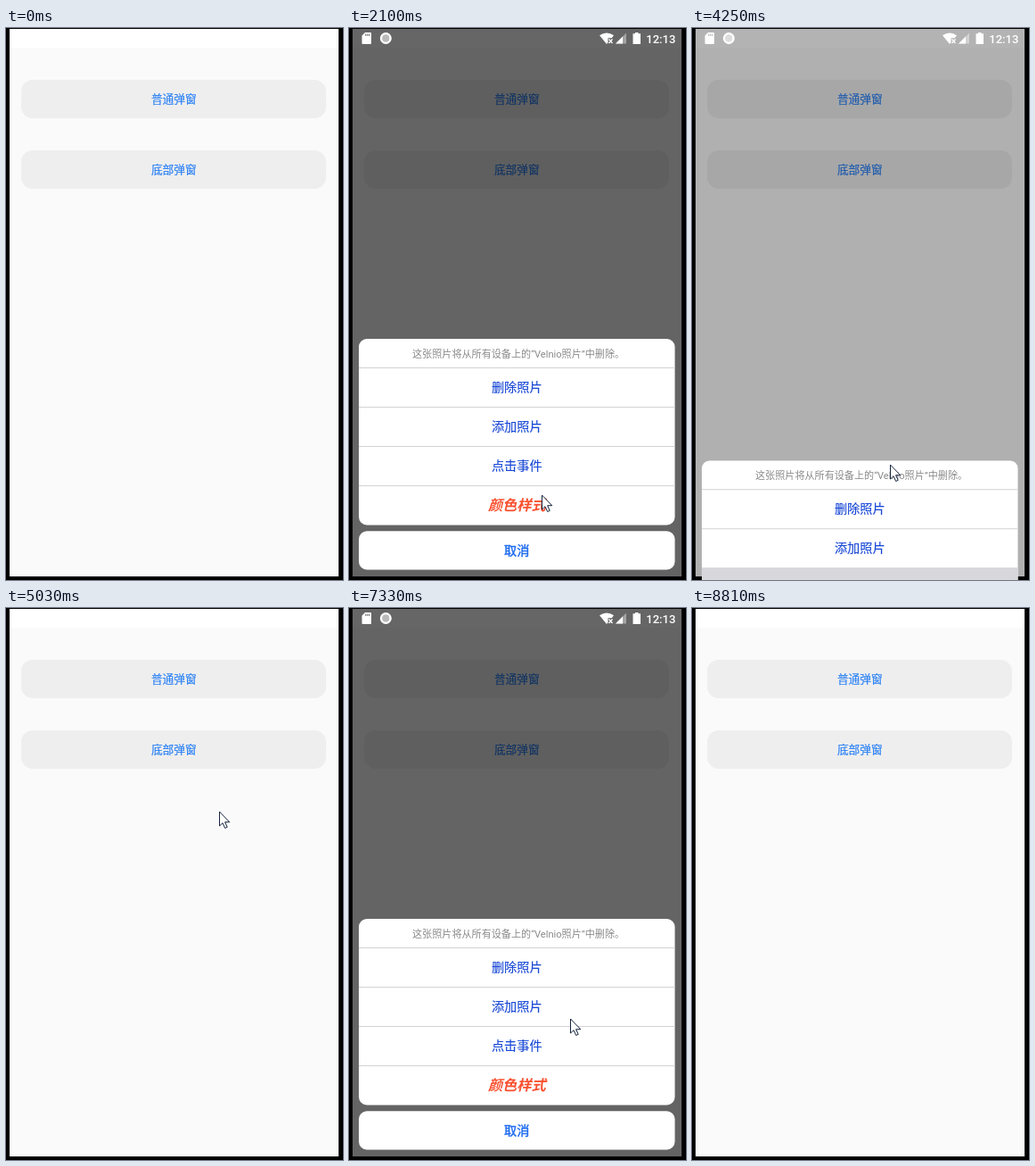
Recreate the animation shown at these times as an HTML page. Size 378 px wide and 618 px high, loop 9370 ms.

```html
<!DOCTYPE html>
<html lang="zh-CN">
<head>
<meta charset="utf-8">
<title>底部弹窗</title>
<style>
  html, body { margin: 0; width: 100%; height: 100%; overflow: hidden; background: #000; }
  svg { display: block; width: 378px; height: 618px; }
  text { font-family: Roboto, "Noto Sans CJK SC", "Noto Sans CJK", sans-serif; }
  .mid { text-anchor: middle; }
  .button { font-size: 12.7px; fill: #2a80f6; stroke: #2a80f6; stroke-width: .2; }
  .row { font-size: 14.2px; fill: #1848d6; stroke: #1848d6; stroke-width: .15; }
  .accent { font-size: 16.2px; font-weight: 700; font-style: italic; fill: #f9502f; }
  .cancel { font-size: 14.2px; fill: #1d6bf0; stroke: #1d6bf0; stroke-width: .45; }
  .note { font-size: 11.1px; fill: #8a8a8a; }
</style>
</head>
<body>
<svg viewBox="0 0 378 618">
  <defs>
    <clipPath id="card"><rect x="11" y="348" width="354.5" height="208.5" rx="9"/></clipPath>
  </defs>
  <rect width="378" height="618"/>
  <rect x="4" y="1" width="369" height="613" fill="#fafafa"/>
  <rect x="4" y="1" width="369" height="21.5" fill="#fff"/>
  <g fill="#eee">
    <rect x="17" y="58" width="342" height="43" rx="13"/>
    <rect x="17" y="137" width="342" height="43" rx="13"/>
  </g>
  <text class="mid button" x="188.3" y="84">普通弹窗</text>
  <text class="mid button" x="188.3" y="163">底部弹窗</text>
  <rect id="dim" x="4" y="1" width="369" height="613" opacity="0"/>

  <!-- status bar -->
  <g fill="#fff">
    <path fill-rule="evenodd" d="M18 5h6q1 0 1 1v11q0 1-1 1h-8.5q-1 0-1-1V8.5zM18.3 6.5v2.5h1v-2.5zM20.3 6.5v2.5h1v-2.5zM22.3 6.5v2.5h1v-2.5z"/>
    <circle cx="41.3" cy="11.5" r="4" opacity=".55"/>
    <circle cx="41.3" cy="11.5" r="5.2" fill="none" stroke="#fff" stroke-width="2.6"/>
    <path d="M281 8.3Q289 2.5 297 8.3L294.7 11.2H290.5V16.2L289 18z"/>
    <path d="M291.5 12.5l4 4.5m0-4.5l-4 4.5" stroke="#fff" stroke-width="1.3"/>
    <path d="M299 17.5h12V5.5z" opacity=".4"/>
    <path d="M299 17.5h8V9.5z"/>
    <path d="M318.5 6.3h2.5V5h3.5v1.3h2.5V18h-8.5z"/>
    <text x="333.3" y="16.5" font-size="13" font-weight="500">12:13</text>
  </g>

  <g id="sheet">
    <g clip-path="url(#card)">
      <rect x="11" y="348" width="355" height="209" fill="#fff"/>
      <g id="rows"></g>
    </g>
    <text class="note" x="71" y="368.5">这张照片将从所有设备上的“Velnio照片”中删除。</text>
    <rect x="11" y="563.3" width="354.5" height="43.2" rx="9" fill="#fff"/>
    <text class="mid cancel" x="188.3" y="589.7">取消</text>
  </g>

  <g id="cursor">
    <circle id="spot" r="14.5" fill="#ff0" opacity=".47"/>
    <path d="M.5 0V16L4 12.7L6.7 18.5L9.2 17.3L6.6 11.7H11.8z" fill="#fff" stroke="#14233c"/>
  </g>
</svg>
<script>
const LOOP = 9370, ENTER = 20, EXIT = 8800;
const DROP = 270, DIM = 0.6, OPENING = 200, CLOSING = 220, TAP = 30;
const $ = id => document.getElementById(id);
const clamp = v => Math.min(1, Math.max(0, v));
const within = (t, a, b) => t >= a && t < b;
const smooth = u => u * u * (3 - 2 * u);
const show = (el, on) => el.setAttribute('visibility', on ? 'visible' : 'hidden');

const rows = [
  { label: '删除照片', press: [6920, 7190] },
  { label: '添加照片', press: [6100, 6600] },
  { label: '点击事件', press: [4000, 4390] },
  { label: '颜色样式', press: [2250, 2750], accent: true }
];
const visits = [{ open: 1227, close: 4140 }, { open: 5415, close: 7820 }];
const taps = [1000, 5290];

// pointer moves; it rests in between, bend bows the path sideways
const origin = { x: 350, y: 618 };
const moves = [
  { from: ENTER, to: 790, x: 205, y: 168, bend: -20 },
  { from: 1430, to: 2170, x: 214, y: 532, bend: 25 },
  { from: 2560, to: 3080, x: 217, y: 589, bend: 0 },
  { from: 3430, to: 3900, x: 222, y: 489, bend: 0 },
  { from: 4390, to: 5290, x: 222, y: 163, bend: 29 },
  { from: 5440, to: 5650, x: 233, y: 397, bend: 0 },
  { from: 5650, to: 5950, x: 246, y: 438, bend: 0 },
  { from: 6510, to: 6920, x: 243, y: 402, bend: 0 },
  { from: 7160, to: 7620, x: 240, y: 587, bend: 7 },
  { from: 8140, to: EXIT, x: 358, y: 618, bend: 0 }
];

$('rows').innerHTML = rows.map(({ label, accent }, i) => {
  const y = 380.5 + 44 * i;
  return `<rect class="press" x="11" y="${y}" width="355" height="44" fill="#d8d8dc"/>
    <path d="M11 ${y}H366" stroke="#d3d3d3"/>
    <text class="mid ${accent ? 'accent' : 'row'}" x="188.3" y="${y + (accent ? 27.6 : 26.4)}">${label}</text>`;
}).join('');
const pressRects = document.querySelectorAll('.press');

function pointer(t) {
  let { x, y } = origin;
  for (const m of moves) {
    if (t < m.from) break;
    const u = smooth(clamp((t - m.from) / (m.to - m.from)));
    x += (m.x - x) * u + m.bend * Math.sin(Math.PI * u);
    y += (m.y - y) * u;
  }
  return `${Math.round(x)} ${Math.round(y)}`;
}

function sheetState(t) {
  const visit = visits.find(v => within(t, v.open, v.close + CLOSING));
  if (!visit) return { drop: DROP, dim: 0 };
  const enter = clamp((t - visit.open) / OPENING);
  const leave = clamp((t - visit.close) / CLOSING);
  return {
    drop: DROP * ((1 - enter) ** 1.75 + leave),
    dim: DIM * enter * (1 - leave)
  };
}

function draw(t) {
  const { drop, dim } = sheetState(t);
  $('sheet').setAttribute('transform', `translate(0 ${drop})`);
  $('sheet').style.display = drop < DROP ? '' : 'none';
  $('dim').setAttribute('opacity', dim);
  rows.forEach((row, i) => show(pressRects[i], within(t, ...row.press)));
  $('cursor').setAttribute('transform', `translate(${pointer(t)})`);
  $('cursor').style.display = within(t, ENTER, EXIT) ? '' : 'none';
  show($('spot'), taps.some(tap => within(t, tap, tap + TAP)));
}

const start = performance.now();
function tick() {
  draw((performance.now() - start) % LOOP);
  requestAnimationFrame(tick);
}
tick();
</script>
</body>
</html>
```
